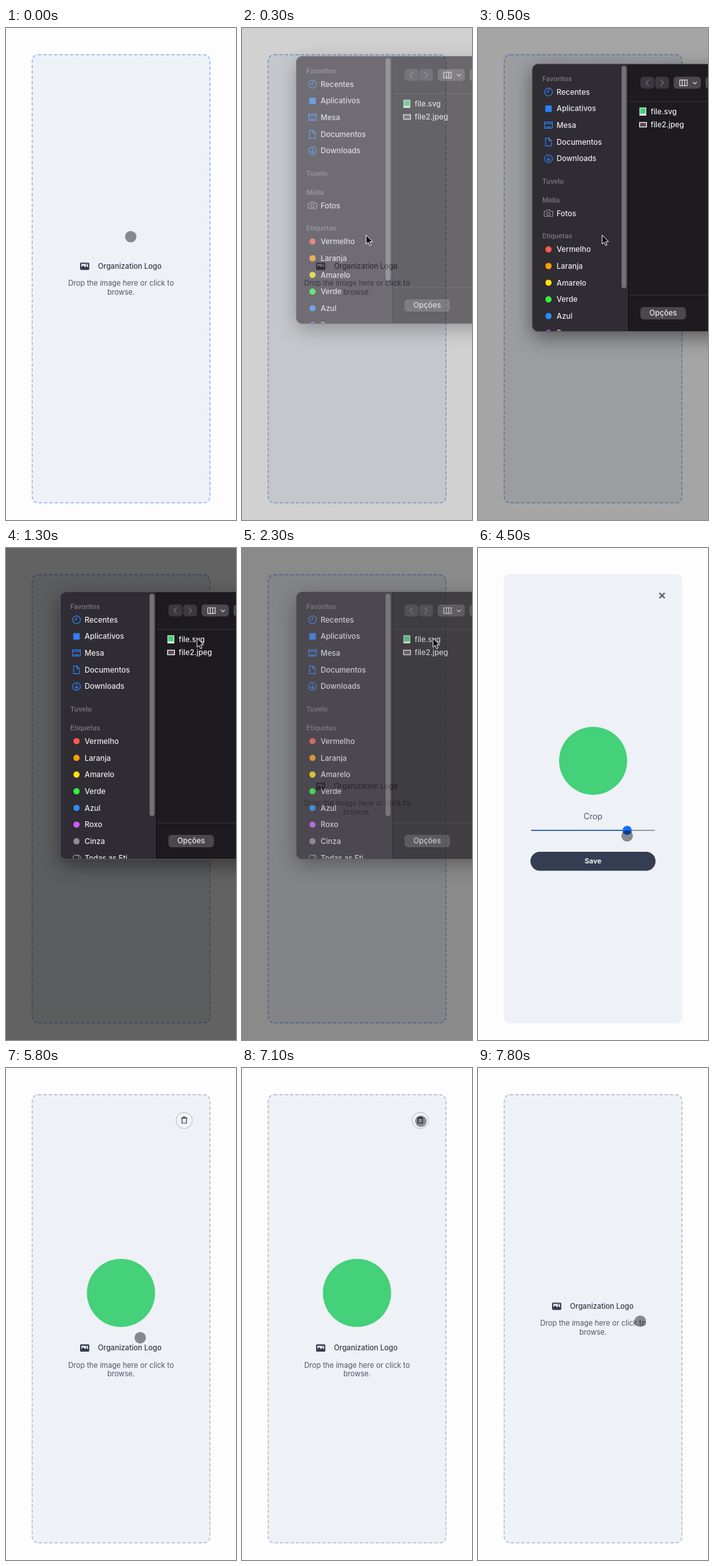
Animation, 354 px wide and 758 px high, one loop 8 s. Source, as an HTML page:

```html
<!DOCTYPE html>
<html lang="en">
<head>
<meta charset="utf-8">
<title>Logo upload</title>
<style>
  html, body { margin: 0; width: 100%; height: 100%; overflow: hidden; background: #fdfdfd; }
  svg { display: block; width: 354px; height: 758px; font-family: Inter, Roboto, sans-serif; }
  .title { font-size: 11.2px; font-weight: 500; fill: #353c4f; }
  .hint { font-size: 11.2px; fill: #50576b; text-anchor: middle; }
  .head { font-size: 10.2px; font-weight: 600; fill: #77737a; }
  .item { font-size: 11.5px; font-weight: 500; fill: #ece9ee; }
  .line { fill: none; stroke-width: 1.2; stroke-linecap: round; stroke-linejoin: round; }
</style>
</head>
<body>
<svg viewBox="0 0 354 758">
  <defs>
    <clipPath id="sideClip"><rect x="84" y="68" width="147" height="410.5"/></clipPath>
  </defs>
  <rect width="354" height="758" fill="#fdfdfd"/>
  <rect x="39.5" y="40.3" width="275" height="692.2" rx="10" fill="#eef1f6"/>

  <g id="drop">
    <rect id="dash" x="40.4" y="41.2" width="273.4" height="690.4" rx="9" fill="none" stroke-width="1.5" stroke-dasharray="5 3.2"/>
    <g id="label">
      <rect x="114" y="361.5" width="14.2" height="11.2" rx="1.6" fill="#353c4f"/>
      <path d="M116 363.6h10.2v5.6l-2.6-2.6-2 2-3-3.2-2.6 3.4z" fill="#eef1f6"/>
      <circle cx="123.8" cy="365" r=".9" fill="#353c4f"/>
      <text class="title" x="141.5" y="371">Organization Logo</text>
      <text class="hint" x="177" y="397.4">Drop the image here or click to</text>
      <text class="hint" x="177" y="411.2">browse.</text>
    </g>
    <g id="preview">
      <circle cx="177" cy="346.6" r="52.5" fill="#45d07a"/>
      <circle cx="274.3" cy="80.8" r="12.5" fill="#f1f4f8" stroke="#b3b9c4"/>
      <path class="line" stroke="#353c4f" d="M269.8 77.2h9M272.6 77v-1.4h3.4V77M270.9 77.4v7.6h6.8v-7.6"/>
    </g>
  </g>

  <g id="crop">
    <path d="M279.3 69.3l8 8M287.3 69.3l-8 8" stroke="#50576b" stroke-width="2"/>
    <circle cx="177.2" cy="327.8" r="52.4" fill="#45d07a"/>
    <text x="177" y="418.3" font-size="12.6" fill="#50576b" text-anchor="middle">Crop</text>
    <rect x="81.5" y="434" width="190.8" height="2" rx="1" fill="#9ba0aa"/>
    <rect id="fill" x="81.5" y="434" height="2" rx="1" fill="#3f6fb5"/>
    <circle id="thumb" cy="435" r="7.1" fill="#176bfa"/>
    <rect x="80.7" y="467.9" width="192.6" height="29.4" rx="14.7" fill="#353d53"/>
    <text x="177" y="486.4" font-size="11" font-weight="600" fill="#fff" text-anchor="middle">Save</text>
  </g>

  <rect id="dim" width="354" height="758"/>

  <g id="dialog">
    <rect x="83.5" y="67.5" width="330" height="412" rx="9" fill="#1d1a20" style="filter:drop-shadow(0 9px 15px rgba(0,0,0,.45))"/>
    <path d="M231 67.5H92.5a9 9 0 0 0-9 9v394a9 9 0 0 0 9 9H231z" fill="#302c33"/>
    <path d="M231.5 68v411" stroke="#0d0b0f"/>
    <path d="M232 125.5h130M232 423.5h130" stroke="#353238"/>
    <rect x="83.5" y="67.5" width="330" height="412" rx="9" fill="none" stroke="#5a575d"/>
    <g clip-path="url(#sideClip)">
      <g id="places"></g>
      <g id="media"></g>
      <g id="tags"></g>
    </g>
    <rect x="221" y="70.5" width="7.5" height="342.5" rx="3.7" fill="#737076"/>
    <g fill="#4a474d">
      <rect x="250" y="87" width="21.7" height="18.5" rx="5" fill="#3b383f"/>
      <rect x="272.7" y="87" width="21.3" height="18.5" rx="5" fill="#3b383f"/>
      <rect x="301" y="87" width="42" height="18.5" rx="5"/>
      <rect x="350" y="87" width="30" height="18.5" rx="5"/>
      <rect x="250" y="442" width="70" height="19" rx="5"/>
    </g>
    <path class="line" stroke="#77747a" d="M262.5 92l-4 4.3 4 4.3M281.5 92l4 4.3-4 4.3"/>
    <path class="line" stroke="#dedbe0" d="M310.5 92h11.5v8.8h-11.5zM314.3 92v8.8M318.2 92v8.8M331 95.3l2.8 2.8 2.8-2.8"/>
    <text class="item" x="285" y="455.3" text-anchor="middle">Opções</text>
    <rect x="248.5" y="134.5" width="10.5" height="12.5" fill="#f4f4f4"/>
    <rect x="249.5" y="135.5" width="8.5" height="8.5" fill="#45d07a"/>
    <rect x="248" y="156.8" width="12" height="8.3" fill="#f0eef0"/>
    <rect x="249.3" y="158.1" width="9.4" height="5.7" fill="#5b4a55"/>
    <text class="item" x="265.8" y="145">file.svg</text>
    <text class="item" x="265.8" y="165.2">file2.jpeg</text>
  </g>

  <path id="arrow" d="M0 0v14l3.2-3 2.2 5 2.3-1-2.2-4.8h4.4z" stroke="#fff"/>
  <circle id="touch" r="8.8" fill-opacity=".43"/>
</svg>

<script>
const LOOP = 8000, ROW = 25.7;
const $ = id => document.getElementById(id);

// Sidebar
const head = (y, s) => `<text class="head" x="99" y="${y + 3.7}">${s}</text>`;
const item = (y, s, icon) => `<g transform="translate(108.5 ${y})">${icon}</g>
  <text class="item" x="121" y="${y + 4.1}">${s}</text>`;
const list = (y, rows) => rows.map(([s, icon], i) => item(y + i * ROW, s, icon)).join('');
const stroke = (d, c = '#2f7ff5') => `<path class="line" stroke="${c}" d="${d}"/>`;
const dot = c => `<circle r="4.8" fill="${c}"/>`;
const ring = 'M-6 0a6 6 0 1 0 12 0a6 6 0 1 0-12 0';
const gray = '#8e8e93';

$('places').innerHTML = head(90, 'Favoritos') + list(110.5, [
  ['Recentes', stroke(ring + 'M0-4v4h-3')],
  ['Aplicativos', '<rect x="-5" y="-5" width="10" height="10" fill="#2f7ff5"/>'],
  ['Mesa', stroke('M-6-5h12v9.5h-12zM-6-2.5h12M-3.5 2.5h7')],
  ['Documentos', stroke('M-4.5-6h5l4 4v8h-9zM.5-6v4h4')],
  ['Downloads', stroke(ring + 'M0-3v6M-2.5 .8l2.5 2.5 2.5-2.5')]
]) + head(248, 'Tuvelo');
$('media').innerHTML = head(277, 'Mídia') + list(297.7, [
  ['Fotos', stroke('M-6.5-3.5h3l1.5-1.8h4l1.5 1.8h3v8h-13zM-2.5 .5a2.5 2.5 0 1 0 5 0a2.5 2.5 0 1 0-5 0', gray)]
]);
$('tags').innerHTML = head(277, 'Etiquetas') + list(297.7, [
  ['Vermelho', dot('#ff5a50')], ['Laranja', dot('#ff9f0a')], ['Amarelo', dot('#ffe20a')],
  ['Verde', dot('#32f53c')], ['Azul', dot('#2b8cff')], ['Roxo', dot('#cc5cff')], ['Cinza', dot(gray)],
  ['Todas as Eti…', stroke('M-5.5 0a4.5 4.5 0 1 0 9 0a4.5 4.5 0 1 0-9 0M2-4.5a4.5 4.5 0 0 1 0 9', gray)]
]);

// Motion
const ramp = (t, a, b) => Math.min(1, Math.max(0, (t - a) / (b - a)));
const ease = p => p * p * (3 - 2 * p);
const mix = (a, b, p) => a + (b - a) * p;
const DRAG = [3950, 4500];

// Each glide: start, end, x, y
const glides = [
  [2900, 3800, 139, 466], [3800, 3950, 139, 443.5], [...DRAG, 229.6, 443.5], [4750, 5200, 214, 484],
  [5600, 6400, 167, 50], [6450, 6800, 275.3, 82], [7100, 7250, 335, 230], [7250, 7450, 295, 431],
  [7500, 7800, 249.7, 390]
];
const glide = (t, from) => glides.reduce(([x, y], [a, b, tx, ty]) => {
  const p = ease(ramp(t, a, b));
  return [mix(x, tx, p), mix(y, ty, p)];
}, from);

const set = (id, attrs) => { for (const k in attrs) $(id).setAttribute(k, attrs[k]); };
const show = (id, on) => { $(id).style.display = on ? '' : 'none'; };
const move = (id, x, y) => set(id, { transform: `translate(${x} ${y})` });

function draw(t) {
  const cropping = t >= 2400 && t < 5600;
  const preview = t >= 5600 && t < 7200;
  show('drop', !cropping);
  show('crop', cropping);
  show('preview', preview);
  set('dash', { stroke: t < 2400 ? '#93b4f5' : '#b2bccb' });
  move('label', 0, preview ? 64.3 : 0);

  const thumb = mix(138.5, 229.6, ease(ramp(t, ...DRAG)));
  set('thumb', { cx: thumb });
  set('fill', { width: thumb - 81.5 });

  set('dim', { opacity: .61 * (ramp(t, 100, 800) - ramp(t, 2200, 2600)) });
  set('dialog', { opacity: ramp(t, 100, 450) - ramp(t, 2200, 2500) });
  move('dialog', 0, mix(-36, 0, ramp(t, 100, 700)));
  const media = t < 1000;
  show('media', media);
  move('tags', 0, media ? 55.3 : 0);

  const p = ease(ramp(t, 900, 1300));
  show('arrow', t >= 200 && t < 2500);
  move('arrow', mix(191, 294, p), mix(319, 139, p));
  show('touch', t < 200 || t >= 2900);
  move('touch', ...(t < 200 ? [192, 321.5] : glide(t, [331, 300])));
}

const start = performance.now();
function tick() {
  draw((performance.now() - start) % LOOP);
  requestAnimationFrame(tick);
}
tick();
</script>
</body>
</html>
```
